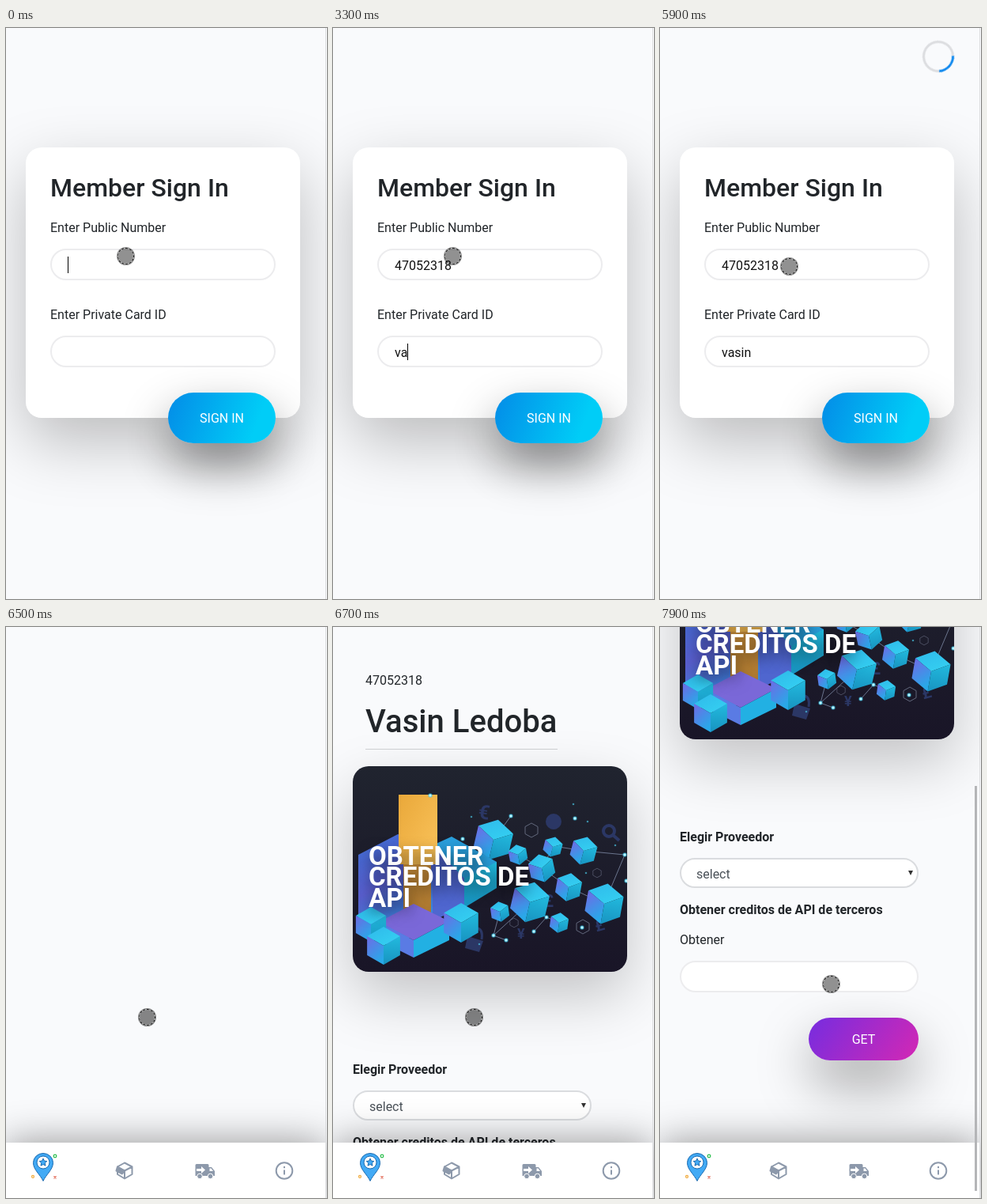
Recreate the animation shown at these times as an HTML page. Size 406 by 722 pixels, loop 8 s.

```html
<!DOCTYPE html>
<html lang="es">
<head>
<meta charset="utf-8">
<title>Member Sign In</title>
<style>
* { box-sizing: border-box; }
html, body { margin: 0; width: 100%; height: 100%; overflow: hidden; background: #f9fafc; }
body { position: relative; font: 16px/19px Roboto, sans-serif; color: #212529; }
div, p, h1, h2, b, svg { position: absolute; margin: 0; white-space: pre; }
svg { left: 0; top: 0; }
.screen { left: 0; top: 0; width: 404px; height: 722px; }
.edge { left: 404px; top: 0; width: 1px; height: 100%; background: #dcdddf; }

/* every animation shares one 8 s clock; 1.25% = 100 ms */
.anim { animation: 8s step-end -20ms infinite; }

.card { left: 25px; width: 347px; border-radius: 20px; }
.panel { top: 151px; height: 342px; background: #fff; box-shadow: 0 30px 80px rgba(0,0,0,.25); }
.field { height: 40px; background: #fff; border: 2px solid #ececee; border-radius: 20px; }
.button { border-radius: 32px; color: #fff; text-align: center; }
.signin { left: 205px; top: 461px; width: 136px; height: 64px; line-height: 65px;
  background: linear-gradient(110deg, #0390e8 5%, #00cdf7 80%); box-shadow: 0 28px 58px rgba(0,0,0,.44); }
.get { left: 188px; top: 788px; width: 139px; height: 54px; line-height: 55px;
  background: linear-gradient(125deg, #7f2cdb 10%, #cf28b6 95%); box-shadow: 0 30px 66px rgba(0,0,0,.36); }
h1 { left: 56px; top: 183px; font: 500 32px/38px Roboto, sans-serif; }

.typed { left: 78px; height: 21px; line-height: 23px; overflow: hidden; box-sizing: content-box;
  color: #111; border-right: 1px solid transparent; }
#number { top: 289px; animation-name: typeNumber, caretNumber; }
#nick { top: 399px; animation-name: typeNick, caretNick; }
@keyframes typeNumber {
  0% { width: 0; } 10% { width: 1ch; } 11.25% { width: 2ch; } 13.75% { width: 3ch; } 15% { width: 4ch; }
  18.75% { width: 5ch; } 21.25% { width: 6ch; } 25% { width: 7ch; } 27.5%, 100% { width: 8ch; }
}
@keyframes caretNumber {
  0%, 8.75% { border-color: #000; }
  1.25%, 35%, 100% { border-color: transparent; }
}
@keyframes typeNick {
  0% { width: 0; } 40% { width: 8px; } 41.25% { width: 16px; } 43.75% { width: 25px; }
  48.75% { width: 29px; } 51.25%, 100% { width: 37.5px; }
}
@keyframes caretNick {
  0%, 57.5%, 100% { border-color: transparent; }
  35% { border-color: #000; }
}

#spinner { left: 332px; top: 16px; width: 40px; height: 40px; border-radius: 50%;
  border: 3px solid #dcdde0; border-top-color: #1189ee; animation-name: wait, spin; }
@keyframes wait { 0% { opacity: 0; } 65%, 100% { opacity: 1; } }
@keyframes spin {
  0%, 65% { transform: rotate(6deg); animation-timing-function: steps(13); }
  81.25%, 100% { transform: rotate(240deg); }
}

#login { animation-name: leave; }
#tabs { animation-name: enter; left: 0; top: 652px; width: 404px; height: 70px; background: #fff;
  box-shadow: 0 0 50px rgba(0,0,0,.42); }
#home { animation-name: arrive; }
#thumb { left: 398px; top: 201px; width: 3px; height: 512px; background: #b4b5b7; animation-name: thumb; }
@keyframes leave { 0% { opacity: 1; } 81.25%, 100% { opacity: 0; } }
@keyframes enter { 0% { opacity: 0; } 81.25%, 100% { opacity: 1; } }
@keyframes thumb { 0% { opacity: 0; } 98.75%, 100% { opacity: 1; } }
@keyframes arrive {
  0%, 81.25% { opacity: 0; transform: translateY(50px); }
  82.5% { opacity: .51; transform: translateY(24px); }
  83.75% { opacity: 1; transform: none; }
  98.75%, 100% { opacity: 1; transform: translateY(-294px); }
}

h2 { left: 41px; top: 96px; font: 500 40px/48px Roboto, sans-serif; }
.rule { left: 41px; top: 154px; width: 243px; height: 1px; background: #d0d2d5; }
.banner { top: 176px; height: 260px; overflow: hidden; }
.glow { top: 176px; height: 260px; box-shadow: 0 30px 74px rgba(0,0,0,.22); }
.slogan { left: 20px; top: 101px; font: 700 33px/26.4px Roboto, sans-serif; color: #fff;
  text-shadow: 0 8px 18px rgba(0,0,0,.6); }
.select { left: 25px; top: 586px; width: 302px; height: 38px; border-color: #dadcdf; }
.arrow { left: 314px; top: 602px; border: solid transparent; border-width: 6px 3px 0; border-top-color: #333; }

#pointer { left: -11px; top: -11px; width: 23px; height: 23px; border-radius: 50%;
  background: rgba(0,0,0,.43); color: #111; animation-name: move, press; }
#pointer::before, #pointer::after { content: ""; position: absolute; inset: 1px; border-radius: 50%; }
#pointer::before { border: 1px solid #bbb; }
#pointer::after { border: 1px dashed; }
@keyframes move {
  0% { transform: translate(151px, 288px); }
  73.75% { transform: translate(163px, 301px); }
  75% { transform: translate(166px, 390px); }
  76.25% { transform: translate(172px, 458px); }
  77.5% { transform: translate(177px, 487px); }
  78.75% { transform: translate(178px, 493px); }
  86.25% { transform: translate(183px, 488px); }
  87.5% { transform: translate(192px, 478px); }
  88.75% { transform: translate(202px, 466px); }
  90% { transform: translate(211px, 456px); }
  91.25%, 100% { transform: translate(216px, 451px); }
}
@keyframes press {
  0%, 98.75%, 100% { background: rgba(0,0,0,.43); color: #111; }
  75% { background: rgba(0,0,0,.47); color: #111; }
  86.25% { background: rgba(0,0,0,.48); color: #444; }
}
</style>
</head>
<body>
<div class="screen anim" id="login">
  <div class="card panel"></div>
  <h1>Member Sign In</h1>
  <p style="left:56px;top:243px">Enter Public Number</p>
  <div class="field" style="left:56px;top:279px;width:285px"></div>
  <div class="typed anim" id="number">47052318</div>
  <p style="left:56px;top:353px">Enter Private Card ID</p>
  <div class="field" style="left:56px;top:389px;width:285px"></div>
  <div class="typed anim" id="nick">vasin</div>
  <div class="button signin">SIGN IN</div>
  <div class="anim" id="spinner"></div>
</div>

<div class="screen anim" id="home">
  <p style="left:41px;top:58px">47052318</p>
  <h2>Vasin Ledoba</h2>
  <div class="rule"></div>
  <div class="card glow"></div>
  <div class="card banner">
    <svg width="347" height="260" viewBox="25 176 347 260">
      <defs>
        <linearGradient id="night" x2="0" y2="1"><stop stop-color="#20242f"/><stop offset="1" stop-color="#191527"/></linearGradient>
        <linearGradient id="gold" x2="1" y2="1"><stop stop-color="#e9a83a"/><stop offset="1" stop-color="#fbc45c"/></linearGradient>
        <linearGradient id="pillar" x2="0" y2="1"><stop stop-color="#e0a044"/><stop offset="1" stop-color="#a8752f"/></linearGradient>
        <linearGradient id="side" x2=".6" y2="1"><stop stop-color="#6f6ae6"/><stop offset="1" stop-color="#28a9e8"/></linearGradient>
        <linearGradient id="lid" x2="1" y2="1"><stop stop-color="#2fb8ea"/><stop offset="1" stop-color="#35d3f2"/></linearGradient>
        <linearGradient id="wall" x2="0" y2="1"><stop stop-color="#22bade"/><stop offset="1" stop-color="#1893c0"/></linearGradient>
        <linearGradient id="block" x2=".4" y2="1"><stop stop-color="#3d6fd6"/><stop offset=".5" stop-color="#5a5fcf"/><stop offset="1" stop-color="#2f8fe0"/></linearGradient>
        <g id="cube">
          <path fill="url(#lid)" d="M0-1 .87-.5 0 0-.87-.5Z"/>
          <path fill="url(#side)" d="M-.87-.5 0 0V1L-.87.5Z"/>
          <path fill="url(#wall)" d="M.87-.5 0 0V1L.87.5Z"/>
        </g>
        <path id="hex" d="M0-9 8-4.5V4.5L0 9-8 4.5V-4.5Z" fill="none" stroke="#747b91" stroke-width=".8"/>
      </defs>
      <path fill="url(#night)" d="M25 176h347v260H25z"/>
      <g fill="#2b3765" font-family="Roboto, sans-serif" font-weight="700" font-size="25">
        <text x="184" y="243" transform="rotate(8 193 233)">€</text>
        <text x="331" y="384" font-size="20" transform="rotate(-15 338 376)">£</text>
        <text x="233" y="394" font-size="18">¥</text>
        <text x="266" y="354" font-size="22">£</text>
        <circle cx="279" cy="246" r="10"/>
        <path d="M170 391 190 397 185 411 167 406Z"/>
        <g fill="none" stroke="#2b3765" stroke-width="4">
          <circle cx="349" cy="258" r="7"/><path d="m354 263 8 7"/>
          <path stroke-width="3" d="M174 392q2-13 9-11t5 14"/>
        </g>
      </g>
      <path fill="none" stroke="#8d9bb8" stroke-width=".7" d="M203 269 225 239M317 283 369 288 343 350M249 348 203 390 219 396M254 385 270 367 287 374M264 305 298 329 343 350M211 360 203 390M279 277 317 283M234 288 264 305 279 277"/>
      <use href="#hex" x="251" y="257"/><use href="#hex" x="316" y="379"/>
      <use href="#hex" transform="translate(334 311) scale(.65)"/><use href="#hex" transform="translate(229 374) scale(.65)"/>
      <use href="#cube" transform="translate(203 269) rotate(13) scale(26)"/>
      <use href="#cube" transform="translate(234 288) rotate(-10) scale(13)"/>
      <use href="#cube" transform="translate(278 278) rotate(14) scale(13)"/>
      <use href="#cube" transform="translate(317 283) rotate(15) scale(18)"/>
      <use href="#cube" transform="translate(264 305) rotate(-12) scale(18)"/>
      <use href="#cube" transform="translate(298 329) rotate(10) scale(18)"/>
      <use href="#cube" transform="translate(249 348) rotate(13) scale(26)"/>
      <use href="#cube" transform="translate(343 350) rotate(10) scale(26)"/>
      <use href="#cube" transform="translate(211 360) rotate(-8) scale(13)"/>
      <use href="#cube" transform="translate(286 374) rotate(8) scale(13)"/>
      <path fill="url(#block)" d="M32 288 82 262 134 276V375L82 400 32 372Z"/>
      <path fill="#4f66cf" d="M126 276 166 300V352L126 372Z"/>
      <path fill="url(#wall)" d="M166 300 207 297V330L166 355Z"/>
      <path fill="#2a9fdc" d="M126 276 150 265 207 297 166 318Z"/>
      <path fill="url(#pillar)" d="M89 290h35v72H89z"/>
      <path fill="url(#gold)" d="M83 212h49v88H83z"/>
      <path fill="#7a68d8" d="M58 373 102 350 147 372 102 396Z"/>
      <path fill="#5a7be4" d="M58 373 102 396V418L58 396Z"/>
      <path fill="#22b0e3" d="M147 372 102 396V418L147 396Z"/>
      <use href="#cube" transform="translate(48 376) scale(22)"/>
      <use href="#cube" transform="translate(64 403) scale(24)"/>
      <use href="#cube" transform="translate(162 374) scale(25)"/>
      <g fill="#bff4ff" stroke="#35c9ee" stroke-opacity=".5" stroke-width="1.5">
        <circle cx="225" cy="239" r="2"/><circle cx="306" cy="242" r="2"/><circle cx="369" cy="288" r="2"/>
        <circle cx="371" cy="321" r="2"/><circle cx="203" cy="390" r="2"/><circle cx="219" cy="396" r="2"/>
        <circle cx="254" cy="385" r="2"/><circle cx="270" cy="367" r="2"/><circle cx="164" cy="268" r="2"/>
        <circle cx="123" cy="213" r="2"/><circle cx="315" cy="380" r="2"/>
        <circle cx="175" cy="240" r=".6"/><circle cx="322" cy="246" r=".6"/><circle cx="357" cy="276" r=".6"/>
        <circle cx="304" cy="224" r=".6"/><circle cx="185" cy="401" r=".6"/><circle cx="320" cy="311" r=".6"/>
      </g>
    </svg>
    <div class="slogan">OBTENER
CREDITOS DE
API</div>
  </div>
  <b style="left:25px;top:550px">Elegir Proveedor</b>
  <div class="field select"></div>
  <p style="left:46px;top:597px;color:#495057">select</p>
  <div class="arrow"></div>
  <b style="left:25px;top:642px">Obtener creditos de API de terceros</b>
  <p style="left:25px;top:680px">Obtener</p>
  <div class="button get">GET</div>
  <div class="field" style="left:25px;top:716px;width:302px"></div>
</div>

<div class="anim" id="tabs">
  <svg width="404" height="70" viewBox="0 652 404 70">
    <path fill="#42aaf5" stroke="#1c6bb0" d="M47 700.500C43 692 34.500 686 34.500 677.500a12.500 12 0 0 1 25 0C59.500 686 51 692 47 700.500Z"/>
    <circle cx="47" cy="677" r="8" fill="#fff" stroke="#1c6bb0"/>
    <path fill="#42aaf5" stroke="#1c6bb0" d="m47 672 1.400 3.100 3.400.4-2.500 2.300.7 3.400-3-1.700-3 1.700.7-3.400-2.500-2.300 3.400-.4Z"/>
    <g fill="none" stroke-width="1.300">
      <circle cx="62" cy="669" r="1.800" stroke="#2ec04f"/>
      <circle cx="34" cy="695" r="1.500" stroke="#f2b04a"/>
      <path stroke="#e0644f" d="m60.500 694.500 3 3m0-3-3 3"/>
    </g>
    <g fill="none" stroke="#8d99ab" stroke-width="2" stroke-linejoin="round">
      <path d="M150 677.500 159.500 682.500V692L150 697.500 141 692V682.500ZM150 687.500V697M150 687.500 141 682.500M150 687.500 159.500 682.500"/>
      <path fill="#8d99ab" d="M141 682.500 150 687.500 147 691.500 139.500 687.500Z"/>
      <circle cx="352" cy="687.500" r="10.300"/>
      <path d="M352 686.500v6M352 682v2.200"/>
    </g>
    <g fill="#8d99ab">
      <path d="M241 679h14a1.500 1.500 0 0 1 1.500 1.500V683h3.500l4 5v6h-24.500v-13.500A1.500 1.500 0 0 1 241 679Z"/>
      <circle cx="245" cy="694.500" r="3.300" stroke="#fff"/><circle cx="258.500" cy="694.500" r="3.300" stroke="#fff"/>
      <path fill="#fff" d="M241 685h6v-3l5 4.500-5 4.500v-3h-6ZM257.500 684.500h2l2.500 3.500h-4.500Z"/>
    </g>
  </svg>
</div>
<div class="anim" id="thumb"></div>
<div class="edge"></div>
<div class="anim" id="pointer"></div>
</body>
</html>
```
